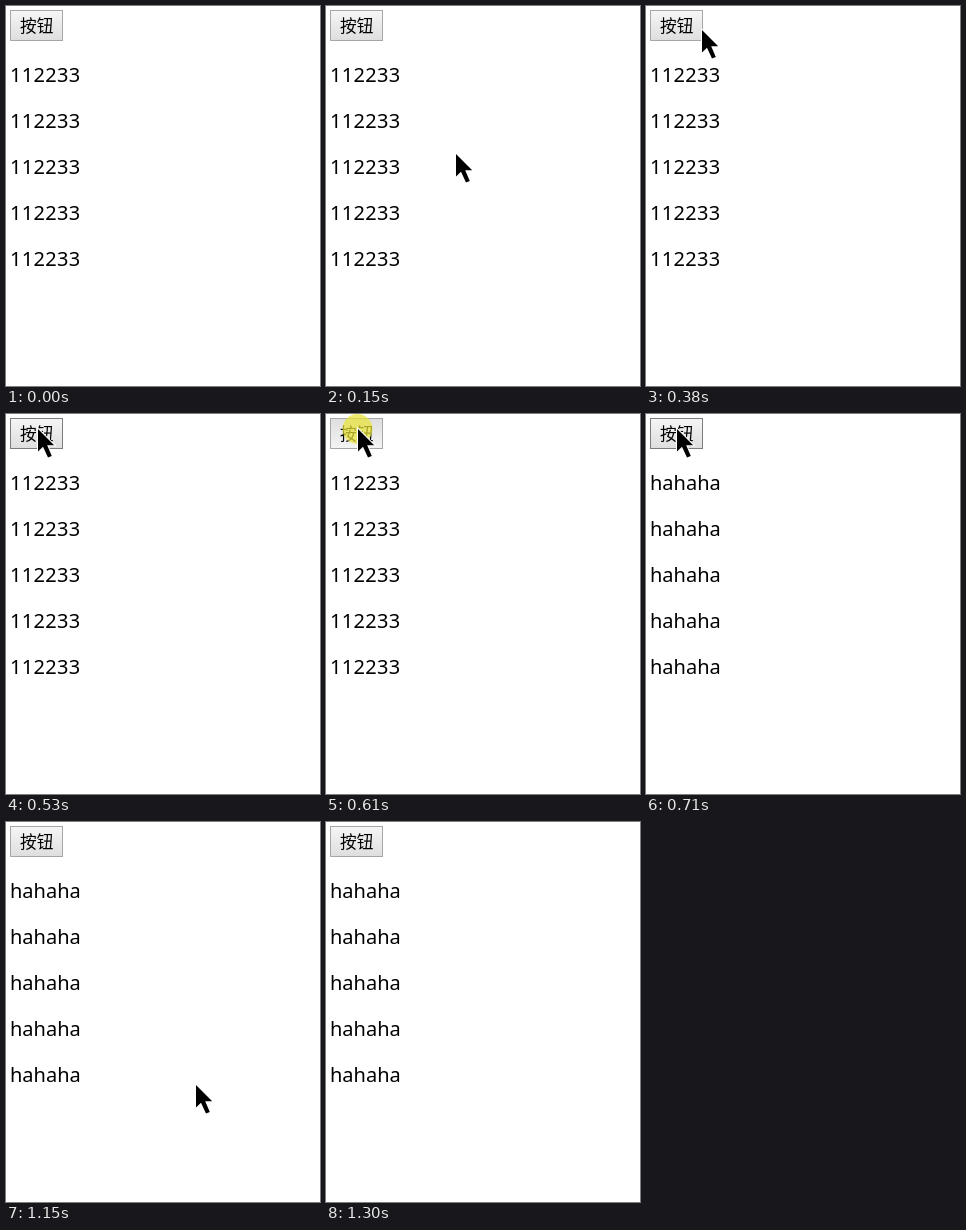
These frames come from a looping animation (314 by 380 pixels, 1.85 s). An HTML page:

```html
<!DOCTYPE html>
<html lang="zh-CN">
<head>
<meta charset="utf-8">
<title>按钮</title>
<style>
  html, body { margin: 0; width: 100%; height: 100%; overflow: hidden; background: #fff; }
  svg { display: block; }
  .line { font: 20px "Noto Sans", "Open Sans", sans-serif; }
  .label { font: 16.7px "Noto Sans CJK SC", "Noto Sans CJK", sans-serif; }
</style>
</head>
<body>
<svg width="314" height="380" viewBox="0 0 314 380">
  <defs>
    <linearGradient id="up" x2="0" y2="1">
      <stop stop-color="#f6f6f6"/><stop offset="1" stop-color="#dedede"/>
    </linearGradient>
    <linearGradient id="down" x2="0" y2="1">
      <stop stop-color="#dedede"/><stop offset="1" stop-color="#f4f4f4"/>
    </linearGradient>
  </defs>
  <rect id="button" x="4.5" y="4.5" width="52" height="30"/>
  <text class="label" x="14" y="26.3">按钮</text>
  <g id="lines"></g>
  <circle id="click" cx="31.5" cy="15" r="15" fill="#e8e337" fill-opacity=".72"/>
  <path id="cursor" d="M0 0V22.5L5 17.8L10 28.5L13.8 27L9.2 16.3H16.2Z"
        stroke="#fff" stroke-width="2" paint-order="stroke"/>
</svg>
<script>
const LOOP = 1850;
const TEXT_CHANGE = 710;

// [start ms, cursor x, cursor y, button state]; no position hides the cursor
const steps = [
  [0],
  [70, 245, 354],
  [150, 130, 148],
  [220, 96, 84],
  [300, 70, 44],
  [380, 56, 24],
  [450, 42, 18, 'hover'],
  [530, 32, 15, 'hover'],
  [610, 32, 15, 'pressed'],
  [710, 31, 15, 'hover'],
  [990, 93, 91],
  [1070, 142, 177],
  [1140, 190, 263],
  [1220, 238, 349],
  [1300]
];

const find = id => document.getElementById(id);
const [button, lines, click, cursor] = ['button', 'lines', 'click', 'cursor'].map(find);
const show = (el, on) => el.setAttribute('visibility', on ? 'visible' : 'hidden');

const rows = Array.from({ length: 5 }, (_, i) => {
  const row = document.createElementNS('http://www.w3.org/2000/svg', 'text');
  row.setAttribute('class', 'line');
  row.setAttribute('x', 4);
  row.setAttribute('y', 76 + i * 46);
  lines.append(row);
  return row;
});

function setText(text, spacing) {
  for (const row of rows) {
    if (row.textContent !== text) row.textContent = text;
    row.style.letterSpacing = spacing;
  }
}

function draw() {
  const time = performance.now() % LOOP;
  const [, x, y, state] = steps.findLast(step => step[0] <= time);
  const pressed = state === 'pressed';

  show(cursor, x !== undefined);
  if (x !== undefined) cursor.setAttribute('transform', `translate(${x} ${y})`);
  show(click, pressed);
  button.setAttribute('fill', pressed ? 'url(#down)' : 'url(#up)');
  button.setAttribute('stroke', state === 'hover' ? '#7c7c7c' : '#a6a6a6');

  if (time < TEXT_CHANGE) setText('112233', '0.3px');
  else setText('hahaha', '0');
  requestAnimationFrame(draw);
}
draw();
</script>
</body>
</html>
```
